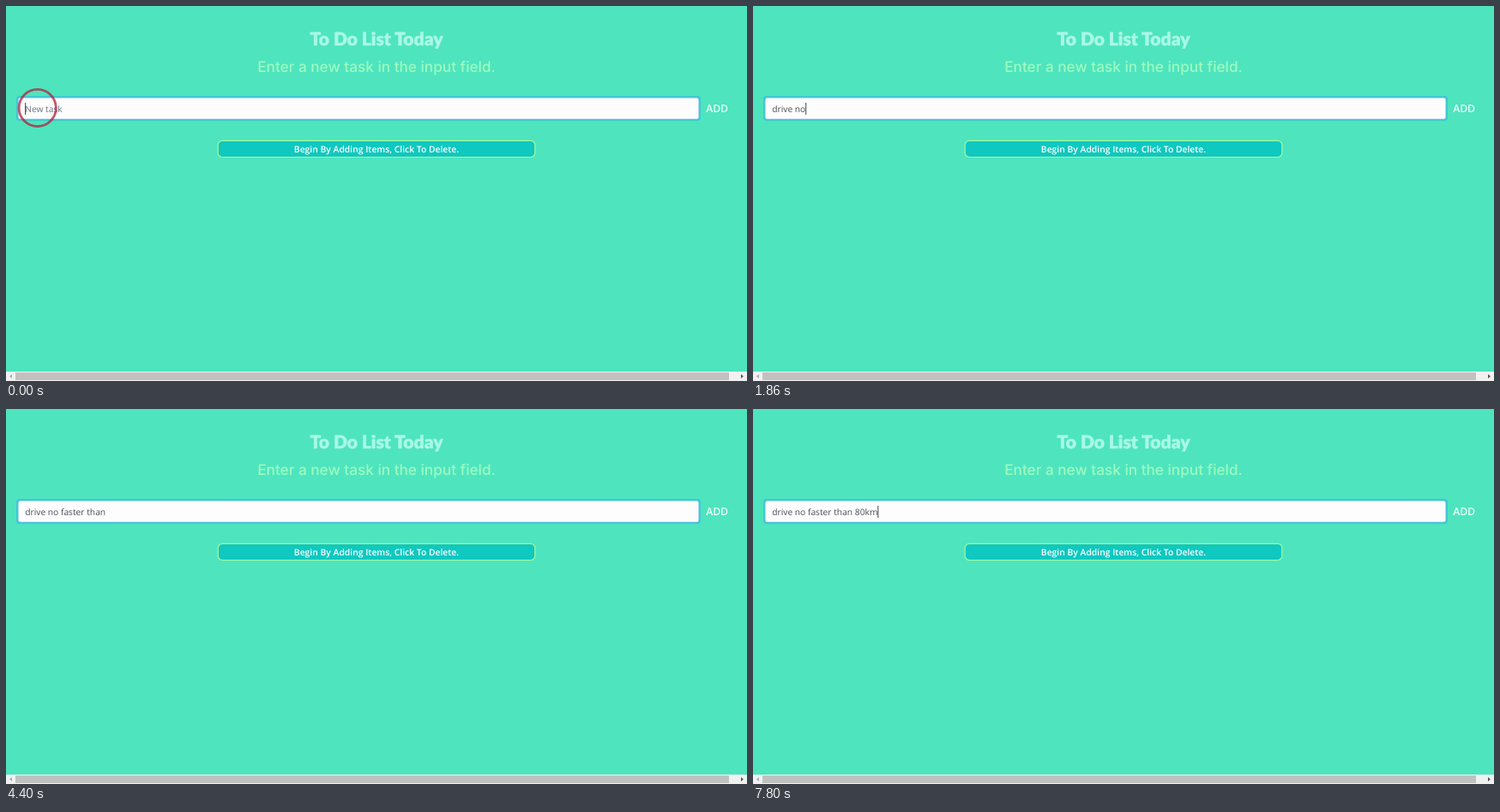
These frames come from a looping animation (864x438 px, 8 s). An HTML page:

```html
<!DOCTYPE html>
<html lang="en">
<head>
<meta charset="utf-8">
<title>To Do List</title>
<style>
  html, body { margin: 0; width: 100%; height: 100%; overflow: hidden; background: #4ee4be; }
  svg { display: block; width: 100vw; height: 100vh; }
  text { white-space: pre; text-rendering: geometricPrecision; }
  .mid { text-anchor: middle; }
  .title { font: 900 21px Lato, sans-serif; fill: #a9f8e6; stroke: #a9f8e6; stroke-width: .5; stroke-linejoin: round; }
  .lead { font: 500 17.2px Inter, sans-serif; fill: #9dfbbf; }
  .add { font: 500 12px Inter, sans-serif; fill: #f4fffb; }
  .item { font: 600 10.35px "Open Sans", sans-serif; fill: #fff; }
  .field { font: 400 10.25px "Open Sans", sans-serif; }
</style>
</head>
<body>
<svg viewBox="0 0 864 438">
  <rect width="864" height="438" fill="#4ee4be"/>
  <text class="title mid" x="432" y="45.5">To Do List Today</text>
  <text class="lead mid" x="432" y="76.5">Enter a new task in the input field.</text>

  <rect x="12" y="105" width="798" height="29.3" rx="4" fill="#3bc9cf"/>
  <rect x="14.2" y="107.2" width="793.6" height="24.9" rx="2.6" fill="#fdfdfd" stroke="#80bdff" stroke-width=".6"/>
  <text id="field" class="field" x="22.2" y="124.3"></text>
  <rect id="caret" y="113" width=".9" height="14" fill="#333"/>
  <text class="add mid" x="829" y="124">ADD</text>

  <rect x="247.2" y="157.3" width="369.6" height="19.2" rx="5" fill="#0fc8bf" stroke="#a4f99a" stroke-width="1.2"/>
  <text class="item mid" x="432" y="171.2">Begin By Adding Items, Click To Delete.</text>

  <rect y="427" width="864" height="11" fill="#f1f1f1"/>
  <rect x="11" y="428" width="832" height="9" fill="#c1c1c1"/>
  <path d="M6.8 430v5l-2.6-2.5z" fill="#a3a3a3"/>
  <path d="M857 430v5l2.8-2.5z" fill="#505050"/>

  <circle id="ring" cx="36.7" cy="119" r="21.6" fill="none" stroke="#b3203c" stroke-width="2.8"/>
</svg>
<script>
  const LOOP = 8000, BLINK = 530, LEFT = 22.2, RING = 330;
  const $ = id => document.getElementById(id);
  const field = $('field'), caret = $('caret'), ring = $('ring');

  // Time of each key press; "<" is backspace.
  const keys = 'drive no faster than 80kn<m';
  const times = [730, 860, 1060, 1200, 1330, 1530, 1730, 1860, 1930, 2130, 2330, 2460, 2730, 2860,
    2930, 3130, 3330, 3530, 3600, 3660, 3860, 5130, 5260, 5600, 5730, 6060, 6730];

  function typed(t) {
    let text = '', last = 0;
    times.forEach((at, i) => {
      if (t < at) return;
      text = keys[i] === '<' ? text.slice(0, -1) : text + keys[i];
      last = at;
    });
    return { text, last };
  }

  function draw(t) {
    const { text, last } = typed(t);
    const label = text || 'New task';
    if (field.textContent !== label) field.textContent = label;
    field.setAttribute('fill', text ? '#495057' : '#6c757d');

    const width = text ? field.getComputedTextLength() : 0;
    caret.setAttribute('x', LEFT + width);
    const held = last === 6060;
    caret.setAttribute('opacity', held || Math.floor((t - last) / BLINK) % 2 === 0 ? 1 : 0);

    // The click ring fades in steps of a fifteenth of a second.
    const step = Math.floor((t + 7) / 66.7);
    ring.setAttribute('opacity', t < RING ? 0.75 * (1 - step / 5) : 0);
  }

  const start = performance.now();
  function tick() {
    draw((performance.now() - start) % LOOP);
    requestAnimationFrame(tick);
  }
  draw(0);
  requestAnimationFrame(tick);
</script>
</body>
</html>
```
